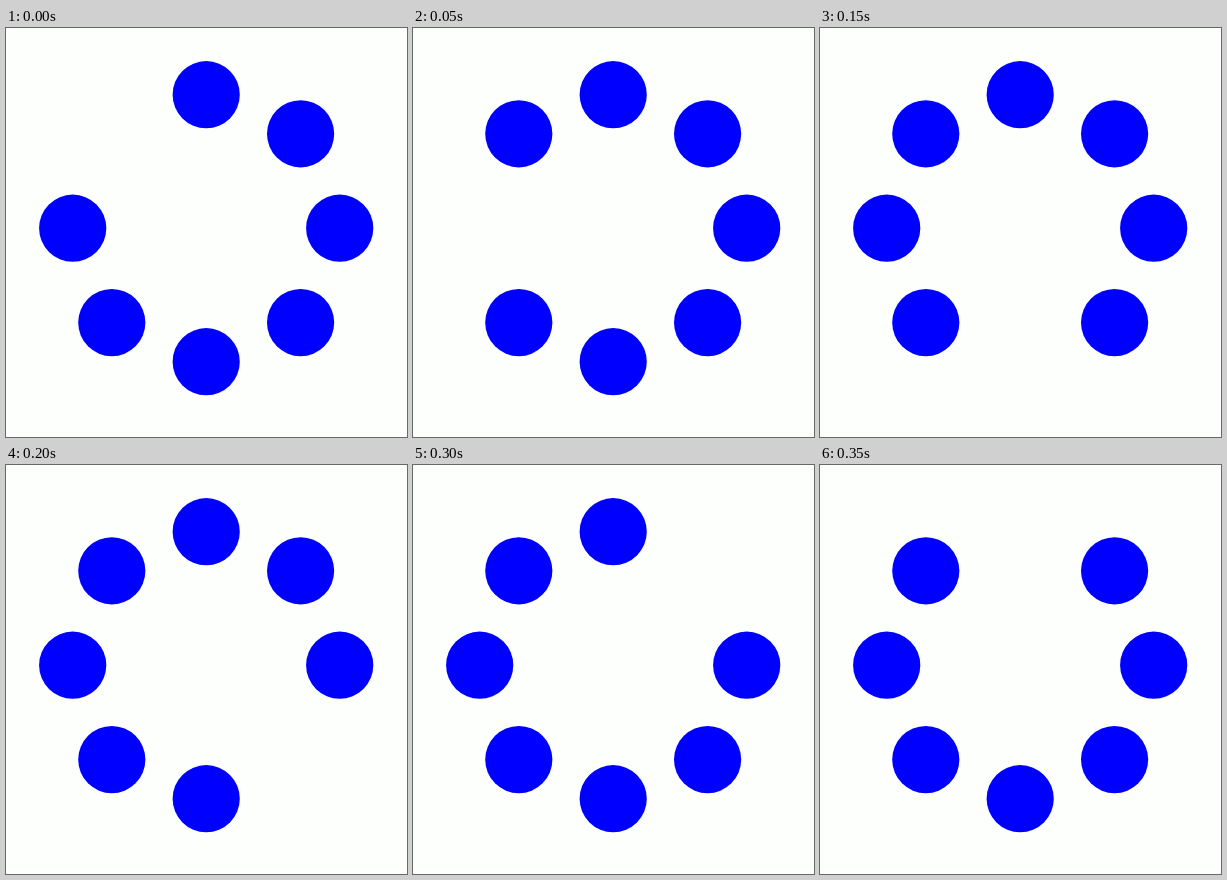
An HTML page for the animation above (0.4 s loop, 401x409 px).

```html
<!DOCTYPE html>
<html lang="en">
<head>
<meta charset="utf-8">
<title>Ring spinner</title>
<style>
  html, body { margin: 0; width: 100%; height: 100%; overflow: hidden; background: #fdfffc; }
  svg { display: block; }
</style>
</head>
<body>
<svg id="ring" width="401" height="409" fill="#00f"></svg>
<script>
const COUNT = 8, STEP_MS = 50, CENTER = 200.2, RING_RADIUS = 133.5, DOT_RADIUS = 33.6;
const ring = document.getElementById('ring');

// Dots run counter-clockwise, starting at the upper left.
const dots = Array.from({ length: COUNT }, (_, i) => {
  const angle = -Math.PI * (3 / 4 + 2 * i / COUNT);
  const dot = document.createElementNS('http://www.w3.org/2000/svg', 'circle');
  dot.setAttribute('cx', CENTER + RING_RADIUS * Math.cos(angle));
  dot.setAttribute('cy', CENTER + RING_RADIUS * Math.sin(angle));
  dot.setAttribute('r', DOT_RADIUS);
  return ring.appendChild(dot);
});

function draw(now) {
  const gap = Math.floor(now / STEP_MS) % COUNT;
  dots.forEach((dot, i) => dot.style.visibility = i === gap ? 'hidden' : 'visible');
}

const start = performance.now();
function tick() {
  draw(performance.now() - start);
  requestAnimationFrame(tick);
}
tick();
</script>
</body>
</html>
```
